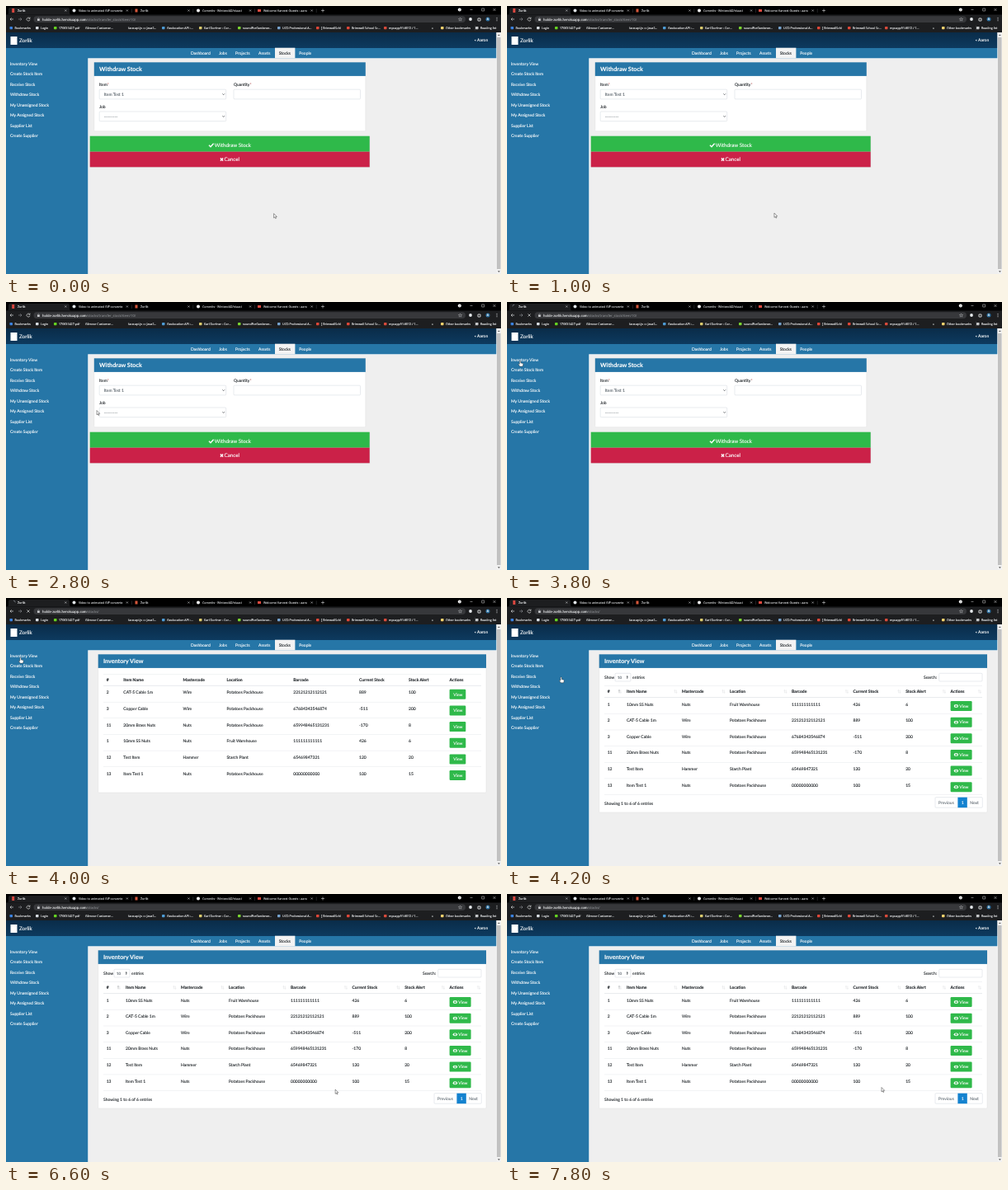
An HTML page that plays this animation: 600 by 325 pixels, repeating every 8000 ms.

```html
<!DOCTYPE html>
<html lang="en">
<head>
<meta charset="utf-8">
<title>Stock pages</title>
<style>
html, body { margin: 0; width: 100%; height: 100%; overflow: hidden; background: #efefef; }
svg { display: block; width: 100vw; height: 100vh; }
text { font-family: Lato, sans-serif; font-size: 5px; white-space: pre; text-rendering: geometricPrecision; stroke-width: .12px; }
.ui text { font-family: "Open Sans", "Noto Sans", sans-serif; font-size: 3.65px; }
</style>
</head>
<body>
<svg id="stage" viewBox="0 0 600 325" xmlns="http://www.w3.org/2000/svg"></svg>
<script>
const BLUE = '#2676a7', INK = '#24292d', LINE = '#dee2e6', GREEN = '#2fb94a', RED = '#cb2148';
const LOOP = 8000, STEP = 200;
const LOAD = 3400, BARE = 4000, READY = 4200;

const rect = (x, y, w, h, fill, more = '') =>
  `<rect x="${x}" y="${y}" width="${w}" height="${h}" fill="${fill}" ${more}/>`;
const text = (x, y, s, fill = INK, more = '') =>
  `<text x="${x}" y="${y}" fill="${fill}" stroke="${fill}" ${more}>${s}</text>`;
const dot = (x, y, r, fill) => `<circle cx="${x}" cy="${y}" r="${r}" fill="${fill}"/>`;
const path = (d, color, w = .6, more = '') =>
  `<path d="${d}" fill="none" stroke="${color}" stroke-width="${w}" ${more}/>`;
const group = (id, body, more = '') => `<g id="${id}" ${more}>${body}</g>`;
const cross = (x, y, r, color, w) => path(`M${x - r} ${y - r}l${2 * r} ${2 * r}m0 ${-2 * r}l${-2 * r} ${2 * r}`, color, w);
const size = (px, weight = 400) => `style="font-size:${px}px;font-weight:${weight}"`;
const box = (x, y, w, h) => rect(x, y, w, h, '#fff', 'rx="1" stroke="#c6cdd3" stroke-width=".4"');

function browser() {
  const grey = '#d0d2d4', bright = '#f1f3f4', bar = '#1d1e20';
  const tabs = [
    [14, 'Zorlik'], [88, 'Video to animated GIF converte'], [163, 'Zorlik'],
    [238, 'Commits · Winterol42/niaaci'], [312, 'Welcome Harvest Guests - aaro']
  ];
  let s = rect(0, 0, 600, 11, '#000') + rect(0, 10.5, 600, 21.5, bar) +
    `<path d="M1 10.5Q3 10.5 3 8V4Q3 2 5 2H75Q77 2 77 4V8Q77 10.5 79 10.5Z" fill="${bar}"/>`;
  tabs.forEach(([x, label], i) => {
    s += text(x, 6.8, label, i ? grey : bright) + cross(72.3 + i * 74.6, 5.5, 1, bright, .5);
    if (i) s += rect(77.5 + i * 74.6, 3.5, .4, 4.5, '#55575b');
  });
  s += dot(82.5, 5.5, 2, '#dfe3e6') + rect(156.5, 3.5, 3, 4, '#d5573b') + dot(233, 5.5, 2, '#fff') +
    rect(305, 4, 4, 3, '#e04a3f') + path('M382 5.5h4m-2-2v4', bright, .5) +
    dot(549.8, 4.6, 2, '#fff') + path('M548.9 4.3l.9.9.9-.9', '#222', .5) +
    path('M562.5 4.5h3M576.7 3h3v3h-3Z', bright, .45) + cross(592, 4.5, 1.5, bright, .45);

  s += path('M9 16H5m1.7-1.7L5 16l1.7 1.7', bright) + path('M15 16h4m-1.7-1.7L19 16l-1.7 1.7', '#95979a');
  s += rect(33.5, 12.2, 523.5, 7.8, '#37383b', 'rx="3.9"') + rect(38, 15.6, 2.8, 2.3, grey) +
    path('M38.6 15.8v-.9q.8-1.3 1.6 0v.9', grey, .4) +
    text(44, 17.6, 'holde-zorlik.herokuapp.com<tspan id="route" fill="#a0a3a7" stroke="none"></tspan>', bright, size(4.1)) +
    path('M550.5 14l.6 1.4 1.5.1-1.1 1 .4 1.5-1.4-.8-1.3.8.3-1.5-1.1-1 1.5-.1Z', grey, .4) +
    dot(563, 16, 1.9, '#e4e8ea') + path('M572 15h3v3h-3Z', bright, .8) + dot(584, 16, 2.5, '#2d6f9e') +
    text(584, 17.3, 'A', '#fff', 'text-anchor="middle"') +
    [14.3, 16, 17.7].map(y => dot(595, y, .5, bright)).join('');

  const marks = [
    [10.5, 'Bookmarks', '#3b82e0'], [42, 'Login', '#d8dde2'], [64, '170631427.pdf', '#65d321'],
    [96, 'Glimvor Customer...'], [148, 'face-api.js — JavaS...'], [195, 'Geolocation API -...', '#4d9bd5'],
    [240, 'Karl Dorfner - Cor...', '#d9c96d'], [287, 'soundForGardener...', '#7bd531'],
    [335, 'UCD Professional A...', '#77a4cf'], [382, '[ BrimwellSchl', '#e04738'],
    [419, 'Brimwell School Sc...', '#e04738'], [464, 'mpcapp91:8012 / 1...', '#d94b3b'],
    [533, 'Other bookmarks', '#f4d26d'], [575, 'Reading list', '#c6c8ca']
  ];
  marks.forEach(([x, label, color]) => {
    s += text(x, 27.8, label, bright) + (color ? rect(x - 6, 24.9, 3.5, 3.4, color, 'rx=".7"') : '');
  });
  s += text(516, 27.8, '»', bright) + rect(568, 23.5, .4, 6, '#55575b');
  s += group('idle', path('M28.6 14.8A2 2 0 1 0 29 16.6M29 13.6v1.7h-1.7', bright) + rect(7.2, 3, 3, 5, '#d9473f')) +
    group('busy', cross(27, 16, 1.6, bright, .6) + '<path id="spin" d="M9 3.2a2.2 2.2 0 0 1 2.2 2.2" fill="none" stroke="#8b9198" stroke-width=".7"/>');
  return group('chrome', s, 'class="ui"');
}

function shell() {
  let s = '<defs><linearGradient id="navy" x2="0" y2="1"><stop stop-color="#0a2c49"/><stop offset="1" stop-color="#0d3a5f"/></linearGradient></defs>' +
    rect(0, 32, 595, 293, '#efefef') + rect(99, 63, 495.5, .9, '#fff') + rect(99, 63, .9, 262, '#fff') +
    rect(0, 32, 594.5, 19, 'url(#navy)') + rect(0, 51, 594.5, 12.3, BLUE) + rect(0, 63, 99.3, 262, BLUE);
  s += rect(5.5, 37, 8, 10, '#fff') + text(16, 44, 'Zorlik', '#fff', size(6.25)) +
    '<path d="M569.3 40.4l-1.5 1.2 1.5 1.2Z" fill="#fff"/>' + text(571, 43.3, 'Aaron', '#fff');
  s += rect(326, 50.7, 24.4, 12.6, '#f3f3f3');
  [[224, 'Dashboard'], [258, 'Jobs'], [278, 'Projects'], [306, 'Assets'], [330.7, 'Stocks'], [355.3, 'People']]
    .forEach(([x, label]) => s += text(x, 58.8, label, label === 'Stocks' ? INK : '#fff'));
  ['Inventory View', 'Create Stock Item', 'Receive Stock', 'Withdraw Stock', 'My Unassigned Stock',
    'My Assigned Stock', 'Supplier List', 'Create Supplier']
    .forEach((label, i) => s += text(5, 71.9 + i * 12.45, label, '#fff'));
  s += rect(594.5, 32, 5.5, 293, '#f1f1f1') + rect(595, 38, 4.5, 281, '#c1c1c1') +
    '<path d="M596 36l1.4-1.6 1.4 1.6ZM596 321.3l1.4 1.6 1.4-1.6Z" fill="#555"/>';
  return s;
}

function card(x, w, bottom, title) {
  return rect(x, 68.3, w, bottom - 68.3, '#fff', 'rx="1" stroke="#dcdcdc" stroke-width=".4"') +
    rect(x, 68.3, w, 16.6, BLUE) + text(x + 6.3, 79.3, title, '#fff', size(7.2, 700));
}

function withdraw() {
  const arrow = y => path(`M262.4 ${y}l1.3 1.3 1.3-1.3`, '#343a40', .7);
  const star = '<tspan fill="#a33" stroke="none">*</tspan>';
  return card(106.8, 329, 151.7, 'Withdraw Stock') +
    text(113, 97, 'Item' + star) + text(276, 97, 'Quantity' + star) + text(113, 123.5, 'Job') +
    box(113.2, 101.2, 153.5, 11.7) + box(276, 101.2, 153.5, 11.7) + box(113.2, 128, 153.5, 11.7) +
    text(118.7, 109, 'Item Test 1', '#5c656d') + text(118.7, 135.6, '---------', '#5c656d') + arrow(106.4) + arrow(133.2) +
    rect(102, 158, 339.2, 37.6, '#d4d4d4') + rect(101.7, 157.7, 339, 19, GREEN) +
    rect(101.7, 176.7, 339, 18.6, RED, 'id="cancel"') +
    path('M246 168.7l2 2 3.6-3.9', '#fff', 1.4) + text(252.8, 170.9, 'Withdraw Stock', '#fff', size(6.25)) +
    cross(261.5, 186.1, 1.6, '#fff', 1.4) + text(264.6, 188.3, 'Cancel', '#fff', size(6.25));
}

const HEADS = ['#', 'Item Name', 'Mastercode', 'Location', 'Barcode', 'Current Stock', 'Stock Alert', 'Actions'];
const PACK = 'Potatoes Packhouse';
const ITEMS = [
  [1, '10mm SS Nuts', 'Nuts', 'Fruit Warehouse', '111111111111', 426, 6],
  [2, 'CAT-5 Cable 1m', 'Wire', PACK, '22121212112121', 889, 100],
  [3, 'Copper Cable', 'Wire', PACK, '67684343546874', -511, 200],
  [11, '20mm Brass Nuts', 'Nuts', PACK, '659948465131231', -170, 8],
  [12, 'Test Item', 'Hammer', 'Starch Plant', '65469847321', 120, 20],
  [13, 'Item Test 1', 'Nuts', PACK, '00000000000', 100, 15]
];

function table(cols, order, top, eye) {
  const rowH = 19.65, first = top + 14.3;
  let s = rect(118, top, 458, .4, LINE) + rect(118, first - .4, 458, .7, LINE);
  HEADS.forEach((h, i) => s += text(cols[i], top + 9, h, INK, size(5, 700)));
  order.forEach((n, r) => {
    const y = first + r * rowH, w = eye ? 26 : 19.7;
    if (r) s += rect(118, y, 458, .4, LINE);
    ITEMS[n].forEach((v, i) => s += text(cols[i], y + 10, v));
    s += rect(537.6, y + 4.5, w, 12, GREEN, 'rx="1.2"') + text(eye ? 548.3 : 542.3, y + 12.3, 'View', '#fff');
    if (eye) s += `<ellipse cx="544.4" cy="${y + 10.5}" rx="2.7" ry="1.9" fill="#fff"/>` +
      dot(544.4, y + 10.5, 1.2, GREEN) + dot(544.1, y + 10.2, .5, '#fff');
  });
  return s + (eye ? rect(118, first + 6 * rowH, 458, .4, LINE) : '');
}

const bare = () => card(111.7, 470.3, 236, 'Inventory View') +
  table([121.7, 142.3, 214.5, 267.5, 348.3, 428, 488, 537.6], [1, 2, 3, 0, 4, 5], 92, false);

function full() {
  const grey = '#6c757d';
  let s = card(111.7, 470.3, 260, 'Inventory View') +
    table([121.7, 145, 212, 270, 345, 419.5, 483.2, 537.6], [0, 1, 2, 3, 4, 5], 106.2, true);
  [136, 203.5, 261.5, 336.5, 411, 474.5, 529, 572].forEach((x, i) => {
    s += path(`M${x} 115.3v-3.8m-.8 1l.8-1 .8 1`, i ? '#d3d6d9' : '#73787d', .4) +
      path(`M${x + 1.9} 111.5v3.8m-.8-1l.8 1 .8-1`, '#d3d6d9', .4);
  });
  s += text(118, 97.8, 'Show') + box(131, 91.3, 19, 9.7) + text(134, 97.7, '10', '#5c656d', size(4.4)) +
    '<path d="M144.8 95.7h2l-1-1.6ZM144.8 96.5h2l-1 1.6Z" fill="#343a40"/>' + text(152, 97.8, 'entries') +
    text(505, 97.8, 'Search:') + box(523.7, 91.3, 52.3, 9.7) +
    text(118, 251, 'Showing 1 to 6 of 6 entries') + box(519, 241.7, 57.3, 12.5) +
    rect(546.4, 241.7, 11.4, 12.5, '#1482cf') + text(523, 249.7, 'Previous', grey) +
    text(550.7, 249.7, '1', '#fff') + text(561.2, 249.7, 'Next', grey);
  return s;
}

const cursor = group('arrow', '<path d="M0 0V5.3L1.2 4.2 2 6 2.9 5.6 2.1 3.8H3.7Z" fill="#fff" stroke="#222" stroke-width=".45"/>') +
  group('hand', '<path d="M-.7 .3Q0-.5.7.3V2.7L3 3.2Q3.7 3.4 3.6 4.3L3 6.8H-.5L-2.1 4.1Q-1.9 3.2-.7 4.1Z" fill="#fff" stroke="#222" stroke-width=".4"/>');

const stage = document.getElementById('stage');
stage.innerHTML = shell() + group('form', withdraw()) + group('bare', bare()) + group('full', full()) +
  browser() + group('cursor', cursor);

const el = id => document.getElementById(id);
const show = (id, on) => el(id).setAttribute('display', on ? 'inline' : 'none');

// time in ms, x, y
const TRACK = [
  [0, 324.6, 251.7], [200, 324.4, 251.5], [800, 324.4, 251.5], [1800, 322.3, 249.7], [2000, 320.5, 247.5],
  [2200, 300, 232], [2600, 180, 175], [3000, 40, 88], [3200, 17, 72], [3800, 16, 71.3], [4000, 17.6, 72.3],
  [4200, 65.6, 96], [4400, 120.5, 122], [4600, 150, 165], [4800, 171, 205], [5000, 177, 223], [5200, 173, 214],
  [5400, 168, 204], [5600, 169, 205], [6000, 270, 228], [6400, 390, 240], [6800, 408.3, 234], [7000, 408.5, 234],
  [7200, 408.5, 234], [7400, 420, 233.7], [7600, 444, 234.2], [7800, 454, 234.5], [8000, 454, 234.5]
];

function position(t) {
  const i = Math.max(1, TRACK.findIndex(p => p[0] >= t));
  const [t0, x0, y0] = TRACK[i - 1], [t1, x1, y1] = TRACK[i], k = (t - t0) / (t1 - t0);
  return [x0 + (x1 - x0) * k, y0 + (y1 - y0) * k];
}

function draw(ms) {
  const t = Math.floor(ms % LOOP / STEP) * STEP;
  const [x, y] = position(t);
  const loading = t >= LOAD && t < READY;
  const overCancel = t < BARE && x > 102 && x < 441 && y > 176.7 && y < 195;
  show('form', t < BARE);
  show('bare', t >= BARE && t < READY);
  show('full', t >= READY);
  show('busy', loading);
  show('idle', !loading);
  el('spin').setAttribute('transform', `rotate(${t * .45} 9 5.4)`);
  el('route').textContent = t < BARE ? '/stocks/transfer_stock/item/10/' : '/stocks/';
  el('cancel').setAttribute('fill', overCancel ? '#ab1c3d' : RED);
  const link = t >= 3000 && t <= READY || overCancel;
  show('hand', link);
  show('arrow', !link);
  el('cursor').setAttribute('transform', `translate(${x} ${y})`);
}

function tick() {
  draw(performance.now());
  requestAnimationFrame(tick);
}
tick();
</script>
</body>
</html>
```
